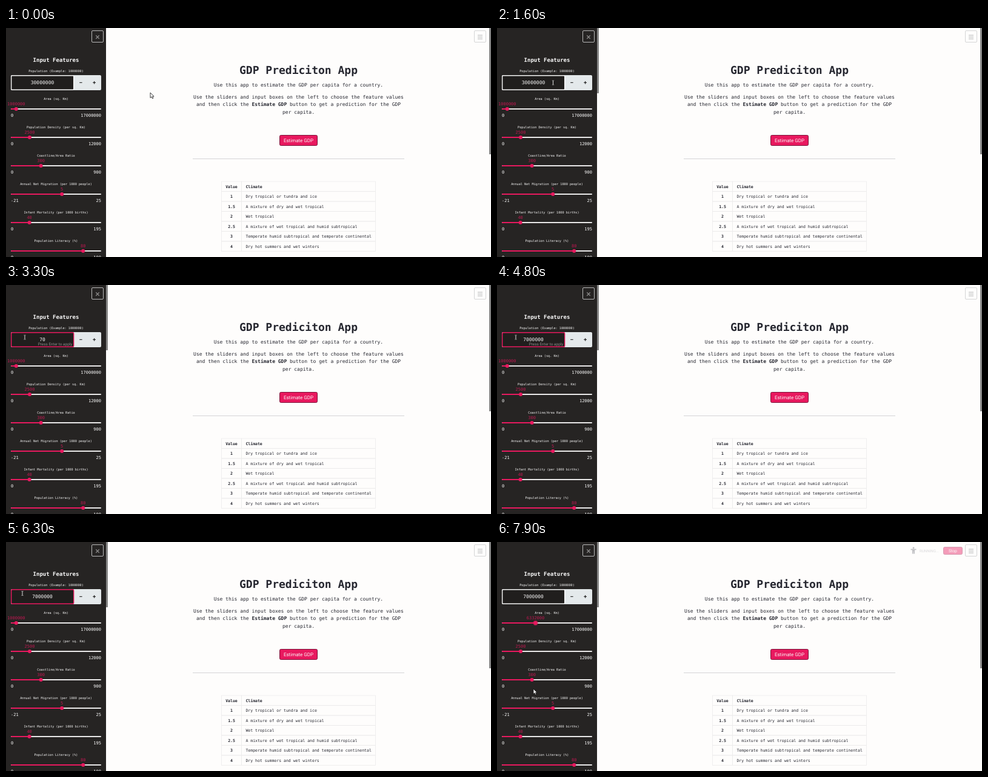
Write an HTML page that moves like this. It is 800 px wide and 379 px high and loops after 8 s.

```html
<!DOCTYPE html>
<html lang="en">
<head>
<meta charset="utf-8">
<title>GDP Prediction</title>
<style>
  html, body { margin: 0; width: 100%; height: 100%; overflow: hidden; background: #fefdfc; }
  svg { display: block; width: 100%; height: 100%; }
  text { font: 8px "DejaVu Sans Mono", monospace; fill: #262730; text-rendering: geometricPrecision; white-space: pre; }
  .bold { font-weight: 700; }
  .light { fill: #fafafa; }
  .accent { fill: #bd1850; }
  .mid { text-anchor: middle; }
  .end { text-anchor: end; }
  .sans { font-family: Roboto, sans-serif; }
</style>
</head>
<body>
<svg id="stage" viewBox="0 0 800 379"></svg>
<script>
const LOOP = 8000, STEP = 100;
const PINK = '#e8195f', TRACK = { x: 8, width: 149, max: 17000000 };
const stage = document.getElementById('stage');

function add(tag, attrs, parent = stage) {
  const node = document.createElementNS('http://www.w3.org/2000/svg', tag);
  for (const key in attrs) node.setAttribute(key, attrs[key]);
  parent.append(node);
  return node;
}
function set(node, attrs) {
  for (const key in attrs) node.setAttribute(key, attrs[key]);
}
function rect(x, y, width, height, fill, extra = {}, parent = stage) {
  return add('rect', { x, y, width, height, fill, ...extra }, parent);
}
function text(str, x, y, size, cls = '', parent = stage) {
  const node = add('text', { x, y, class: cls, style: `font-size:${size}px` }, parent);
  node.textContent = str;
  return node;
}
function show(node, visible) {
  node.style.display = visible ? '' : 'none';
}

// Main page
rect(0, 0, 800, 379, '#fefdfc');
text('GDP Prediciton App', 482.5, 76.3, 18, 'bold mid');
text('Use this app to estimate the GDP per capita for a country.', 482.5, 96.5, 8, 'mid');
text('Use the sliders and input boxes on the left to choose the feature values', 482.5, 116.8, 8, 'mid');
const line = text('and then click the ', 482.5, 129.4, 8, 'mid');
add('tspan', { class: 'bold' }, line).textContent = 'Estimate GDP';
line.append(' button to get a prediction for the GDP');
text('per capita.', 482.5, 142, 8, 'mid');
rect(451.5, 177.5, 62, 17, PINK, { rx: 2, stroke: '#7a1238' });
text('Estimate GDP', 482.5, 189, 8, 'sans light mid');
rect(308, 216, 349, 1, '#d4d4d6');

// Climate table
const rows = [
  ['Value', 'Climate'],
  ['1', 'Dry tropical or tundra and ice'],
  ['1.5', 'A mixture of dry and wet tropical'],
  ['2', 'Wet tropical'],
  ['2.5', 'A mixture of wet tropical and humid subtropical'],
  ['3', 'Temperate humid subtropical and temperate continental'],
  ['4', 'Dry hot summers and wet winters']
];
const ROW = 16.5;
rows.forEach(([value, climate], i) => {
  const y = 254 + i * ROW;
  rect(355.5, y, 33, ROW, 'none', { stroke: '#ecebec', 'stroke-width': .8 });
  rect(388.5, y, 221, ROW, 'none', { stroke: '#ecebec', 'stroke-width': .8 });
  text(value, 372, y + 10.7, 6.5, 'bold mid');
  text(climate, 395.4, y + 10.7, 6.5, i ? '' : 'bold');
});

// Window controls
rect(797, 0, 3, 209, '#858585');
rect(772.5, 4.5, 19, 19, '#fefdfc', { rx: 1.5, stroke: '#d5d5d6' });
for (const y of [11.5, 14.5, 17.5]) rect(778, y, 8, 1, '#b4b4b6');

// Running indicator
const running = add('g');
add('circle', { cx: 687, cy: 9.8, r: 1.5, fill: '#6f7078' }, running);
add('path', {
  d: 'M682.5 12.4H691.5M685.8 12.5V19.5M688.2 12.5V19.5M685.8 14.5H688.2',
  stroke: '#6f7078', 'stroke-width': 1.8, fill: 'none'
}, running);
const status = text('RUNNING...', 697, 17, 6.2, 'sans', running);
status.style.fill = '#a8a8ad';
rect(736.5, 8.5, 31, 12, PINK, { rx: 2, stroke: '#a3154a' }, running);
text('Stop', 752, 17, 6.8, 'sans light mid', running);

// Sidebar
rect(0, 0, 165, 379, '#262423');
const sideScroll = rect(165, 0, 3, 108, '#858585');
rect(141.5, 4.5, 19, 19, 'none', { rx: 1.5, stroke: '#b9b9b9' });
add('path', { d: 'M148.3 12.3l5.4 5.4m0-5.4l-5.4 5.4', stroke: '#8b8a8a', 'stroke-width': 1.3 });
text('Input Features', 82.5, 56, 9, 'bold light mid');
text('Population (Example: 1000000)', 82.5, 73, 5.2, 'light mid');

// Number field
rect(8, 78, 149, 25, '#e4e9eb', { rx: 2 });
const field = rect(8.7, 78.7, 103, 23.6, '#201e1d', { rx: 1.5, 'stroke-width': 1.4 });
const plusHover = rect(134, 78, 23, 25, PINK, { rx: 2 });
rect(121.2, 89.8, 4.4, 1.1, '#222');
const plus = add('path', { d: 'M143.3 90.4h4.6m-2.3-2.3v4.6', 'stroke-width': 1.1 });
const selection = rect(41, 85, 0, 10, '#3b6fb5');
const population = text('', 60, 93.2, 8, 'light mid');
const hint = text('Press Enter to apply', 109.3, 99.7, 6.4, 'sans end');
hint.style.fill = '#8d8c8c';

// Sliders
const sliders = [
  ['Area (sq. Km)', 0, 17000000, 1000000, 16.8],
  ['Population Density (per sq. Km)', 0, 12000, 2500, 39],
  ['Coastline/Area Ratio', 0, 900, 300, 57.6],
  ['Annual Net Migration (per 1000 people)', -21, 25, 5, 92.2],
  ['Infant Mortality (per 1000 births)', 0, 195, 40, 38.6],
  ['Population Literacy (%)', 0, 100, 80, 127.2]
].map(([label, min, max, value, x], i) => {
  const y = 134 + i * 47;
  text(label, 82.5, y - 14.6, 5.2, 'light mid');
  rect(TRACK.x, y - 1, TRACK.width, 2, '#e9e8e8', { rx: 1 });
  const fill = rect(TRACK.x, y - 1, x - TRACK.x, 2, PINK, { rx: 1 });
  const ring = add('circle', { cx: x, cy: y, r: 4.2, fill: PINK, opacity: .55 });
  const thumb = add('circle', { cx: x, cy: y, r: 3, fill: PINK });
  const caption = text(value, x, y - 6.4, 7, 'accent mid');
  text(min, 8, y + 12.7, 7, 'light');
  text(max, 157, y + 12.7, 7, 'light end');
  show(ring, false);
  return { fill, ring, thumb, caption };
});

// Pointers, each drawn around its hot spot
const pointers = {
  arrow: add('path', {
    d: 'M0 0V8.6L2 6.8 3.4 9.8 4.9 9.1 3.5 6.2H6Z',
    fill: '#fff', stroke: '#111', 'stroke-width': .8
  }),
  hand: add('path', {
    d: 'M-.8 0Q0 -1 .8 0V3L4.4 3.7Q5.2 4 5 5L4.2 8H-.4L-3 5Q-2.6 3.8 -.8 5Z',
    fill: '#fff', stroke: '#111', 'stroke-width': .8
  }),
  beam: add('path', {
    d: 'M-1.4 -3.5H-.4M.4 -3.5H1.4M0 -3V3M-1.4 3.5H-.4M.4 3.5H1.4',
    fill: 'none', stroke: '#f4f4f4', 'stroke-width': .9
  })
};

// Time, x, y
const path = [
  [0, 238, 107], [300, 232, 106], [800, 146, 88], [1000, 142, 86], [1200, 142, 87],
  [1600, 92.5, 90.5], [1900, 86, 90], [2100, 84, 90], [2600, 31, 86.5], [6000, 31, 86.5],
  [6300, 27, 85], [6700, 17, 134], [6900, 17, 134], [7500, 63.5, 134],
  [7600, 63.5, 135], [7900, 60, 243], [8000, 60, 243]
];
const typed = [
  [0, '30000000'], [2900, '7'], [3200, '70'], [3600, '700'], [3900, '7000'],
  [4200, '70000'], [4500, '700000'], [4700, '7000000']
];

function pointerAt(t) {
  const i = Math.max(1, path.findIndex(p => p[0] > t));
  const [t0, x0, y0] = path[i - 1], [t1, x1, y1] = path[i];
  const k = (t - t0) / (t1 - t0), e = k * k * (3 - 2 * k);
  return [x0 + (x1 - x0) * e, y0 + (y1 - y0) * e];
}
function between(t, from, to) {
  return t >= from && t < to;
}

function render(t) {
  const [x, y] = pointerAt(t);
  const inside = x < 165;
  const overField = between(x, 8, 112) && between(y, 78, 103);
  const overPlus = between(x, 134, 157) && between(y, 78, 103);
  const overThumb = between(t, 6700, 7600);
  const kind = overField ? 'beam' : overPlus || overThumb ? 'hand' : 'arrow';
  for (const name in pointers) show(pointers[name], name === kind);
  set(pointers[kind], { transform: `translate(${x} ${y})` });

  show(sideScroll, inside);
  show(plusHover, overPlus);
  set(plus, { stroke: overPlus ? '#fff' : '#222' });
  set(field, { stroke: between(t, 2100, 6800) ? PINK : '#f4f4f4' });
  population.textContent = typed.findLast(step => step[0] <= t)[1];
  show(hint, between(t, 2900, 5300));
  const left = Math.max(40.7, x);
  show(selection, between(t, 2100, 2900));
  set(selection, { x: left, width: Math.max(0, 79.3 - left) });

  const thumbX = t < 6900 ? 16.8 : Math.min(63.5, Math.max(16.8, t < 7500 ? x : 63.5));
  const area = t < 6900 ? 1000000 : t >= 7500 ? 6332000
    : Math.round((thumbX - TRACK.x) / TRACK.width * TRACK.max / 1000) * 1000;
  const { fill, ring, thumb, caption } = sliders[0];
  set(fill, { width: thumbX - TRACK.x });
  set(ring, { cx: thumbX });
  set(thumb, { cx: thumbX });
  set(caption, { x: thumbX });
  caption.textContent = area;
  show(ring, t >= 6800);

  show(running, between(t, 5500, 6200) || t >= 7900);
  set(running, { opacity: t === 5500 || t >= 7900 ? .42 : 1 });
}

const start = performance.now();
function tick() {
  const t = (performance.now() - start) % LOOP;
  render(Math.floor(t / STEP) * STEP);
  requestAnimationFrame(tick);
}
tick();
</script>
</body>
</html>
```
